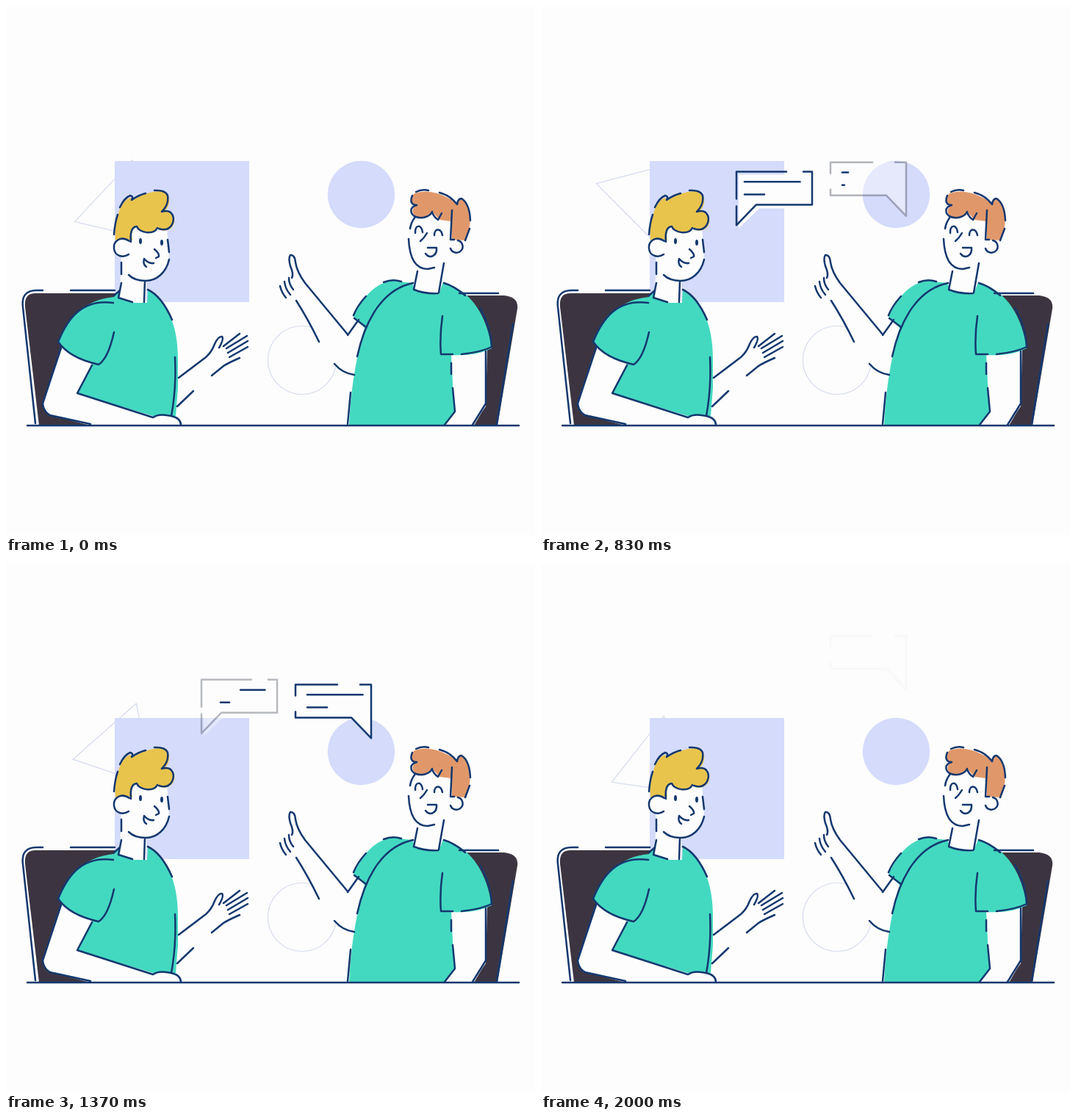
Write an HTML page that moves like this. It is 720 px wide and 720 px high and loops after 2.03 s.

```html
<!DOCTYPE html>
<html lang="en">
<head>
<meta charset="utf-8">
<title>Conversation</title>
<style>
  html, body { margin: 0; width: 100%; height: 100%; overflow: hidden; background: #fdfdfd; }
  svg { display: block; width: 100%; height: 100%; }
  .ink { fill: none; stroke: #14386f; stroke-width: 2.5; stroke-linecap: round; stroke-linejoin: round; }
  .skin { fill: #fdfdfd; }
  .shirt { fill: #43d9c0; }
  .chair { fill: #3c3541; }
  .soft { fill: #d4dbfb; }
  .thin { fill: none; stroke: #d6dbef; stroke-width: 1.2; }
</style>
</head>
<body>
<svg viewBox="0 0 720 720">
  <!-- backdrop -->
  <path id="triangle" class="thin" d="M205.5 319.6L93.5 293.7 171.9 209.6Z"/>
  <rect class="soft" x="148" y="211" width="183" height="192"/>
  <circle class="soft" cx="483.5" cy="256.5" r="45.7"/>
  <circle class="thin" cx="403" cy="482" r="46.5"/>

  <!-- left person -->
  <path class="chair" d="M26 410Q24 391 40 391H156V480L115 571H45Z"/>
  <path class="skin" d="M78 460L50 542 57 556 115 571H239Q237 560 222 557L235 506 272 478Q281 470 284 460L294 450 296 462 318 446 329 455 329 465 318 479 280 503 233 545 200 560 97 527 118 485Z"/>
  <path class="shirt" d="M71 457C84 425 106 400 147 396L154 388 156 398 173 404 192 404 193 387C218 400 234 432 234 480V520L231 558H200L97 527 118 486Q85 479 71 457Z"/>
  <path class="skin" d="M157 330L155 397Q172 405 191 403V374Q218 370 222 345L219 300 180 292 166 318Z"/>
  <circle class="skin" cx="158.500" cy="328.500" r="12"/>
  <path class="skin" d="M200 560Q208 554 224 558 238 561 238 571H180Z"/>
  <path fill="#e9c44c" d="M149 319C147 300 152 278 160 268Q168 257 173 264 190 253 209 252C224 252 226 270 216 279 232 278 233 299 222 304 214 308 208 304 205 302 201 313 181 309 178 300Q169 302 172 319L160 316Z"/>
  <g class="ink">
    <path d="M40 568L23 410Q20 387 42 387H50M88 387H148M147 394L155 387"/>
    <path d="M71 457C84 425 104 398 146 404M71 457Q86 479 126 488 139 480 147 444M117 489L97 527 200 560Q208 554 225 558 238 561 238 570"/>
    <path d="M75 465L50 541Q51 552 60 557L115 569M230 478Q232 520 225 558M193 386Q212 395 226 427"/>
    <path d="M235 506L272 478Q280 471 284 460 289 449 294 450 297 453 290 465M296 463L318 446M300 466L328 449M302 472L329 456M304 478L329 464M280 503L296 490Q302 486 318 479M233 545L255 524"/>
    <path d="M157 349V365M157 377L153 397 172 403M189 374L188 403M222 345C218 363 205 374 190 374Q175 374 167 366M220 318L222 335M168 320C156 312 146 320 147 330 148 341 160 343 167 338"/>
    <path d="M147 311Q148 296 152 284M155 274Q161 261 169 258 174 259 171 264 181 257 190 255M202 251Q217 250 220 258 222 270 212 280M212 280C228 275 231 291 225 299Q219 307 208 303M206 302C201 312 181 309 178 300Q168 301 170 321"/>
    <path d="M202 331Q209 337 208 341L204 343M191 355Q186 352 188 344 194 351 201 350"/>
  </g>
  <g fill="#14386f"><ellipse cx="183" cy="320" rx="2" ry="4"/><ellipse cx="212" cy="322" rx="2" ry="4"/></g>

  <!-- right person -->
  <path class="chair" d="M620 394H678Q698 396 696 412L669 571H637L652 545Z"/>
  <path class="skin" d="M384 340H391L407 377 465 447 490 430 476 502 447 487 426 457 395 401 375 390 390 370Z"/>
  <path class="skin" d="M604 470L655 466 653 545 634 571H596Z"/>
  <path class="shirt" d="M473 423C485 396 504 376 526 374L553 377 557 387 589 392 595 376C636 388 655 425 661 466Q640 477 606 475L610 552 597 571H467Q470 500 488 438Z"/>
  <path class="skin" d="M550 290L549 325Q553 352 563 356L556 388 589 392 597 345 608 318 605 270 560 275Z"/>
  <circle class="skin" cx="613" cy="327" r="9"/>
  <path fill="#e0986a" d="M556 255Q580 246 613 268 620 257 627 268 637 290 626 319L607 318 606 293 590 291 581 281Q572 292 559 287 549 281 557 272 546 266 556 255Z"/>
  <g class="ink">
    <path d="M617 391H670M690 433L668 569M653 470V541L635 570"/>
    <path d="M465 447L407 377Q396 362 394 349 393 338 387 339 384 343 387 354 392 365 389 370M385 370Q385 379 391 386M379 375Q380 385 387 393M373 381Q375 390 381 397M395 401Q411 426 426 457M447 487Q458 500 474 502M465 448L480 427"/>
    <path d="M473 421Q478 408 490 395M474 425L490 437M514 376Q526 371 538 375M478 477C486 440 506 387 554 377M469 526L465 569M596 377Q610 381 625 394M594 422Q590 450 592 474H608M620 474Q647 471 661 464 660 437 645 411M606 486V501M608 520L611 552 597 570"/>
    <path d="M560 361L555 386Q570 392 588 391M596 350L589 390M548 317C549 340 556 358 574 358L583 356M557 287Q551 295 550 303M605 330A8.500 8.500 0 1 0 615 319"/>
    <path d="M558 253Q566 249 575 251M590 254Q605 258 614 270 615 262 620 262 631 269 632 292M631 303L625 319M553 258C549 267 553 271 559 271 548 274 550 284 558 287 566 290 577 287 580 280M580 281Q583 288 588 291L593 282M607 278L605 318H610"/>
    <path d="M557 309C556 297 566 297 567 308M583 312C583 302 592 302 594 312M573 309Q569 316 564 320M574 329H586C587 340 577 345 571 337"/>
  </g>
  <path class="ink" d="M29 571H698"/>

  <g id="left">
    <g class="body">
      <path class="skin" d="M269 4H371V50H297L269 77Z"/>
      <path class="ink" d="M266 37V0H334M357 0H369V45H293L266 73V47"/>
    </g>
    <path class="ink line"/><path class="ink line"/>
  </g>
  <g id="right">
    <g class="body">
      <path class="skin" d="M394 0H497V73L470 45H394Z"/>
      <path class="ink" d="M394 15V0H451M482 0H497V73L470 45H394V37"/>
    </g>
    <path class="ink line"/><path class="ink line"/>
  </g>
</svg>
<script>
const LOOP = 2030;
const byId = id => document.getElementById(id);
const ramp = (t, a, b) => Math.min(1, Math.max(0, (t - a) / (b - a)));
const smooth = (t, a, b) => { const p = ramp(t, a, b); return p * p * (3 - 2 * p); };

// Hermite curve through [time, value] points
function curve(points, t) {
  const last = points.length - 1;
  if (t <= points[0][0]) return points[0][1];
  if (t >= points[last][0]) return points[last][1];
  const i = points.findIndex(p => p[0] > t) - 1;
  const slope = k => {
    const a = points[Math.max(0, k - 1)], b = points[Math.min(last, k + 1)];
    return (b[1] - a[1]) / (b[0] - a[0]);
  };
  const [t0, y0] = points[i], [t1, y1] = points[i + 1];
  const d = t1 - t0, u = (t - t0) / d, v = 1 - u;
  return v * v * (1 + 2 * u) * y0 + u * u * (1 + 2 * v) * y1
    + d * u * v * (v * slope(i) - u * slope(i + 1));
}

const spin = [[0, 0], [570, 98.5], [830, 152], [1170, 210], [1730, 309.5], [LOOP, 360]];

const bubbles = [
  {
    id: 'left', x: 277,
    rise: [[400, 268], [480, 253], [570, 238], [700, 231], [830, 225.5], [1080, 213],
      [1170, 204], [1270, 182], [1370, 159], [1480, 149], [1600, 146]],
    fadeIn: [410, 560], fadeOut: [1200, 1480], write: [500, 800], erase: [1215, 1505]
  },
  {
    id: 'right', x: 410,
    rise: [[720, 232], [830, 213], [930, 188], [1030, 176], [1170, 172.5], [1370, 165.5],
      [1490, 160], [1570, 150], [1650, 131], [1730, 113], [1850, 103], [2000, 99]],
    fadeIn: [730, 970], fadeOut: [1600, 2010], write: [770, 1070], erase: [1555, 1855]
  }
];

for (const b of bubbles) {
  b.group = byId(b.id);
  b.body = b.group.querySelector('.body');
  b.outline = b.body.querySelector('.ink');
  b.lines = [...b.group.querySelectorAll('.line')];
}

function drawBubble(b, t) {
  const opacity = ramp(t, ...b.fadeIn) * (1 - ramp(t, ...b.fadeOut));
  const from = smooth(t, ...b.erase), to = smooth(t, ...b.write);
  b.group.setAttribute('transform', `translate(0 ${curve(b.rise, t)})`);
  b.body.setAttribute('opacity', opacity);
  b.outline.style.stroke = opacity < 1 ? '#4b5260' : '';
  b.lines.forEach((line, i) => {
    const length = i ? 27 : 75.5, y = i ? 31 : 13.8;
    line.setAttribute('d', to > from ? `M${b.x + length * from} ${y}H${b.x + length * to}` : '');
  });
}

function draw(t) {
  byId('triangle').setAttribute('transform', `rotate(${curve(spin, t)} 150 264.5)`);
  bubbles.forEach(b => drawBubble(b, t));
}

const start = performance.now();
function tick(now) {
  draw(Math.max(0, now - start) % LOOP);
  requestAnimationFrame(tick);
}
draw(0);
requestAnimationFrame(tick);
</script>
</body>
</html>
```
